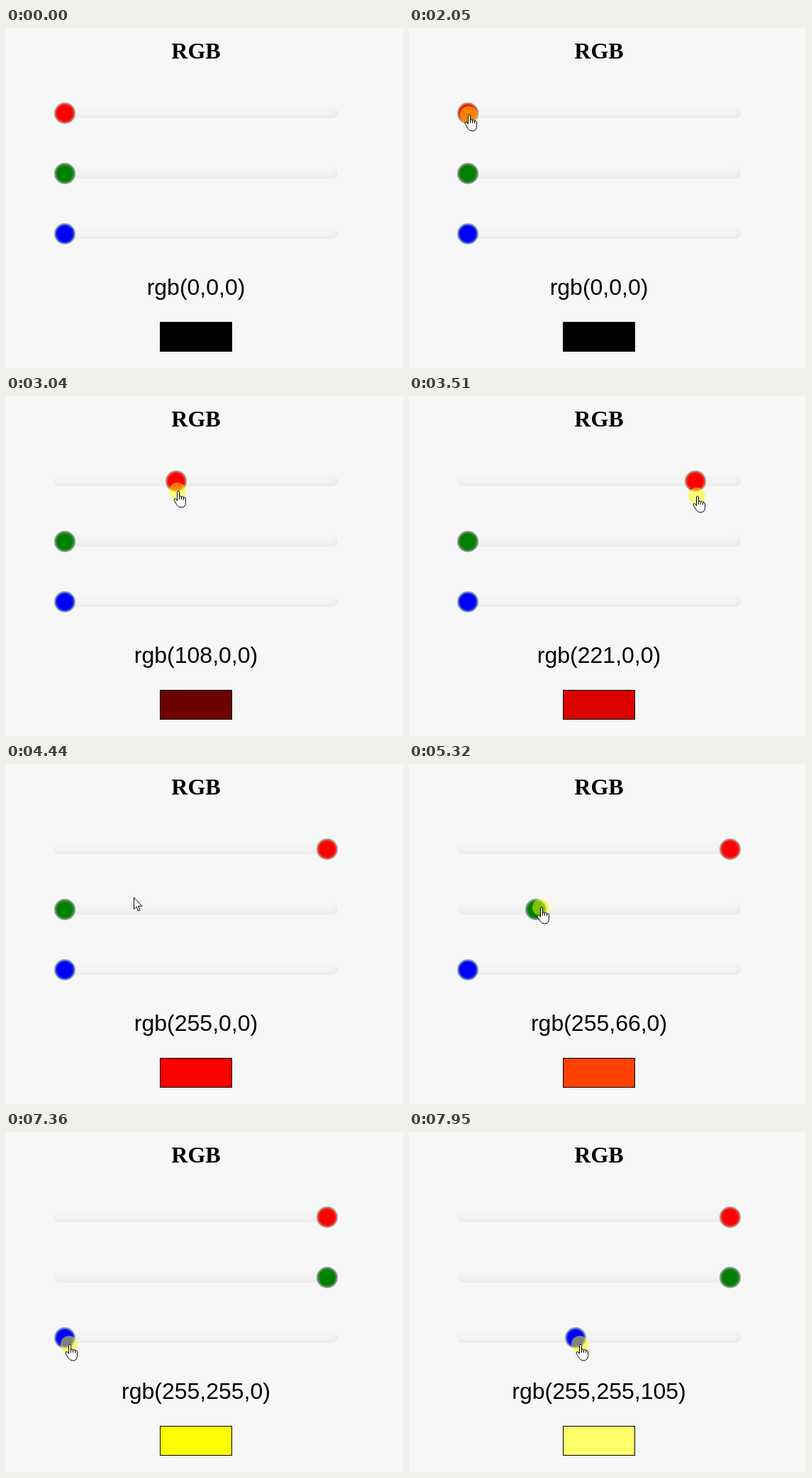
Write an HTML page that moves like this. It is 560 px wide and 479 px high and loops after 8 s.

```html
<!DOCTYPE html>
<html lang="en">
<head>
<meta charset="utf-8">
<title>RGB sliders</title>
<style>
  html, body { margin: 0; width: 100%; height: 100%; overflow: hidden; background: #f7f7f7; }
  #stage { position: relative; width: 560px; height: 479px; overflow: hidden; }
  #stage > * { position: absolute; }
  .text { left: 68px; width: 400px; font-size: 32px; line-height: 36px; text-align: center; white-space: nowrap; }
  #title { top: 14px; font-family: "Liberation Serif", "Times New Roman", serif; font-weight: bold; }
  #label { top: 347px; font-family: "Liberation Sans", Arial, sans-serif; }
  .track {
    left: 68px; width: 400px; height: 15px; border-radius: 8px;
    background: #f4f4f4; box-shadow: inset -2px -4px 5px #ebebeb;
  }
  .thumb {
    width: 30px; height: 30px; box-sizing: border-box;
    border: 2px solid; border-radius: 50%;
    box-shadow: inset 0 0 3px rgba(190, 190, 190, .7);
  }
  #swatch { left: 217px; top: 414px; width: 100px; height: 40px; border: 1px solid #000; }
  #overlay { left: 0; top: 0; }
</style>
</head>
<body>
<div id="stage">
  <div id="title" class="text">RGB</div>
  <div id="label" class="text"></div>
  <div id="swatch"></div>
  <svg id="overlay" width="560" height="479">
    <g id="cursor" fill="#fff" stroke="#000" stroke-linejoin="round" stroke-linecap="round">
      <circle id="halo" r="12" fill="#ff0" fill-opacity=".5" stroke="none"/>
      <path id="arrow" d="M.5.5V16.5L4.2 13 6.7 18.8 9 17.8 6.6 12.2H11.5Z"/>
      <path id="hand" transform="translate(0 -.5)" d="M-.5 13.5V2.2Q-.5.7 1 .7T2.5 2.2V8Q4.5 6.8 5.5 8.4 7.5 7.4 8.5 9.2 11.5 8.8 11.5 11.5V16Q11.5 23.5 5.5 23.5 1 23.5-1 20L-5 13.2Q-5.3 10.5-3 11.2ZM2.5 8V12M5.5 8.4V12M8.5 9.2V12.5"/>
    </g>
  </svg>
</div>
<script>
const LOOP = 8000, FRAME = 1000 / 15, MIN_X = 83, RANGE = 370;
const $ = id => document.getElementById(id);
const clamp = v => Math.max(0, Math.min(1, v));

const entry = [4, 170];

// pointer moves: start, end, x, y, power of the ease-in
const moves = [
  [1120, 1710, 84, 122, 1],
  [2050, 2640, 120.8, 128, 3],
  [2640, 3510, 405.5, 141, 1.1],
  [3510, 3850, 485, 149, 1],
  [3900, 4590, 90, 200, 1],
  [4760, 5320, 185.8, 202, 2],
  [5320, 6100, 486, 229, 1],
  [6100, 6240, 502, 228, 1],
  [6590, 7360, 89, 299, 1],
  [7430, 7950, 241.4, 299, 2]
];

// grab is the pointer x at which the value is zero
const sliders = [
  { y: 120, color: '#f00', rim: '#b5907c', down: 2050, up: 3900, grab: 84.5 },
  { y: 205, color: '#008000', rim: '#86968f', down: 4760, up: 6430, grab: 90 },
  { y: 290, color: '#00f', rim: '#7aa3b0', down: 7360, up: LOOP, grab: 89 }
];

function addDiv(name, top) {
  const el = document.createElement('div');
  el.className = name;
  el.style.top = top + 'px';
  return $('stage').insertBefore(el, $('overlay'));
}

for (const s of sliders) {
  addDiv('track', s.y - 8);
  s.thumb = addDiv('thumb', s.y - 15);
  s.thumb.style.background = s.color;
  s.thumb.style.borderColor = s.rim;
}

// The screen refreshes in even steps within each move.
function pointerAt(t) {
  let [x, y] = entry;
  for (const [start, end, toX, toY, power] of moves) {
    if (t < start) break;
    const steps = Math.floor((t - start) / FRAME + 0.01);
    const k = t >= end ? 1 : clamp(steps * FRAME / (end - start)) ** power;
    x += (toX - x) * k;
    y += (toY - y) * k;
  }
  return [x, y];
}

function valueOf(s, t, x) {
  if (t < s.down) return 0;
  if (t >= s.up) return 255;
  return Math.round(255 * clamp((x - s.grab) / RANGE));
}

function show(id, on) {
  $(id).setAttribute('visibility', on ? 'visible' : 'hidden');
}

function draw(t) {
  const [x, y] = pointerAt(t);
  let pressed = false, hover = false;
  const values = sliders.map(s => {
    const v = valueOf(s, t, x), cx = MIN_X + v * RANGE / 255;
    s.thumb.style.left = Math.round(cx - 15) + 'px';
    pressed = pressed || (t >= s.down && t < s.up);
    hover = hover || Math.hypot(x - cx, y - s.y) < 15;
    return v;
  });
  const rgb = `rgb(${values})`;
  $('label').textContent = rgb;
  $('swatch').style.background = rgb;

  const visible = t >= moves[0][0], hand = pressed || hover;
  $('cursor').setAttribute('transform', `translate(${Math.round(x)} ${Math.round(y)})`);
  show('halo', visible && pressed);
  show('hand', visible && hand);
  show('arrow', visible && !hand);
}

const begin = performance.now();
function tick() {
  draw((performance.now() - begin) % LOOP);
  requestAnimationFrame(tick);
}
tick();
</script>
</body>
</html>
```
